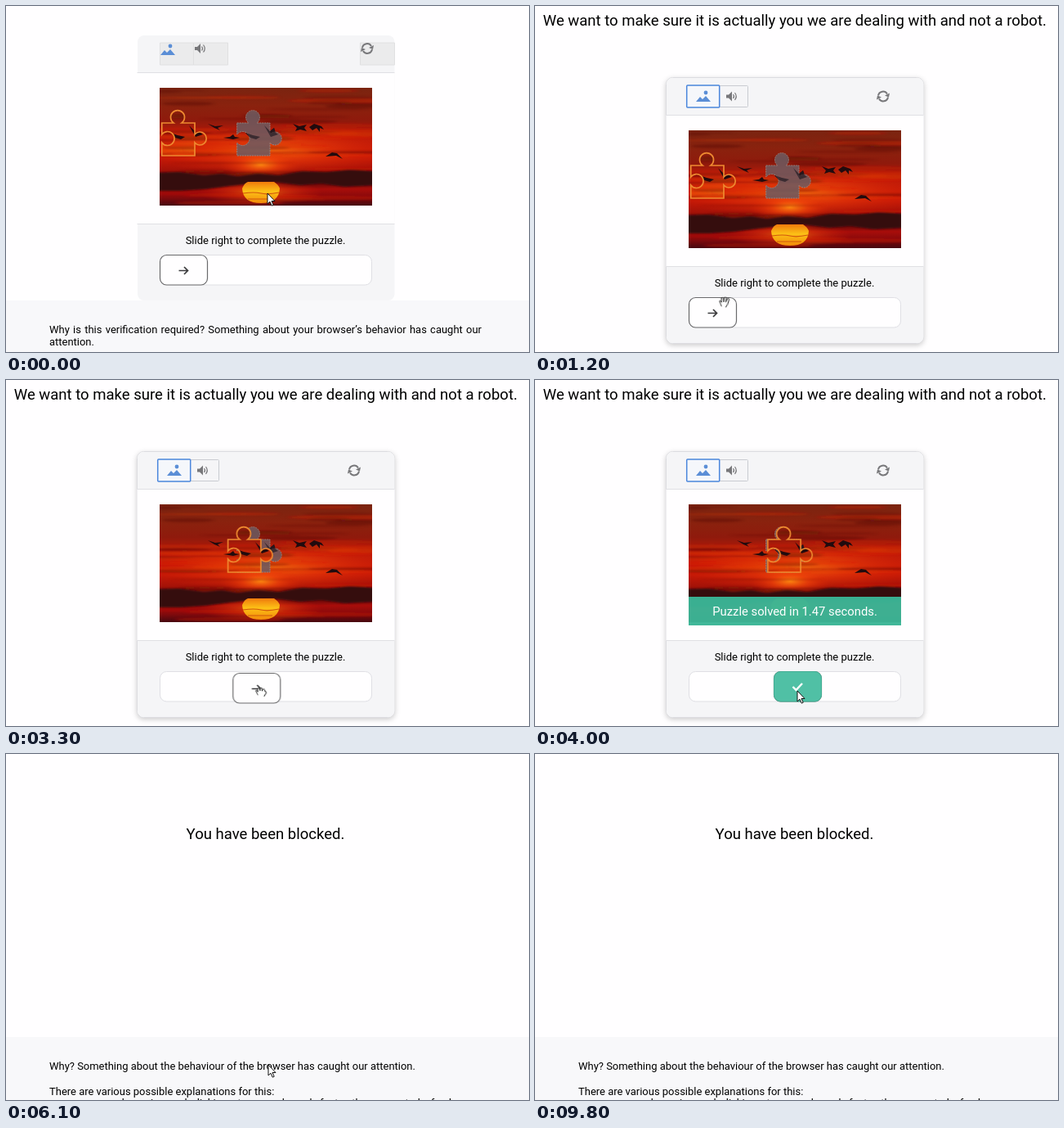
Animation of 640 by 423 pixels, one loop 9900 ms. Source, as an HTML page:

```html
<!DOCTYPE html>
<html lang="en">
<head>
<meta charset="utf-8">
<title>Slide puzzle check</title>
<style>
html, body { margin: 0; width: 100%; height: 100%; overflow: hidden; background: #fffeff; }
#stage { position: relative; width: 640px; height: 423px; overflow: hidden; font: 12.98px/15.4px Roboto, sans-serif; color: #000; }
#stage > svg { position: absolute; left: 0; top: 0; }
.footer { position: absolute; left: 0; width: 529px; height: 400px; padding: 28px 58px 0 53px; background: #f8f8fa; text-align: justify; }
.footer p { margin: 0 0 15.6px; }
.footer ul { margin: -17px 0 0; padding: 0 0 0 39px; }
text { font-family: Roboto, sans-serif; font-size: 13.03px; text-anchor: middle; }
.big { font-size: 18.55px; }
</style>
</head>
<body>
<div id="stage">
  <div class="footer" id="why" style="top:360px">
    <p>Why is this verification required? Something about your browser’s behavior has caught our attention.</p>
  </div>
  <div class="footer" id="reasons" style="top:346px">
    <p>Why? Something about the behaviour of the browser has caught our attention.</p>
    <p>There are various possible explanations for this:</p>
    <ul>
      <li>you are browsing and clicking at a speed much faster than expected of a human being</li>
      <li>something is preventing JavaScript from working on your computer</li>
      <li>there is a robot on the same network as you</li>
    </ul>
  </div>

  <svg width="640" height="423" viewBox="0 0 640 423">
    <defs>
      <linearGradient id="sky" x2="0" y2="1">
        <stop offset="0" stop-color="#7a2410"/>
        <stop offset=".15" stop-color="#8a220e"/>
        <stop offset=".28" stop-color="#8f1a0c"/>
        <stop offset=".42" stop-color="#bd1a08"/>
        <stop offset=".58" stop-color="#cb1a06"/>
        <stop offset=".7" stop-color="#a31208"/>
        <stop offset=".78" stop-color="#5a0d0e"/>
        <stop offset=".86" stop-color="#a80d0a"/>
        <stop offset=".93" stop-color="#840a0c"/>
        <stop offset="1" stop-color="#460810"/>
      </linearGradient>
      <radialGradient id="glow">
        <stop offset="0" stop-color="#ff8a10" stop-opacity=".95"/>
        <stop offset=".45" stop-color="#f5480a" stop-opacity=".6"/>
        <stop offset="1" stop-color="#e02506" stop-opacity="0"/>
      </radialGradient>
      <linearGradient id="sunFill" x2="0" y2="1">
        <stop offset="0" stop-color="#f07a0c"/>
        <stop offset=".45" stop-color="#fcc016"/>
        <stop offset="1" stop-color="#f28a0a"/>
      </linearGradient>
      <filter id="soft" x="-10%" y="-50%" width="120%" height="200%"><feGaussianBlur stdDeviation="2.5 .8"/></filter>
      <clipPath id="frame"><rect x="188" y="152" width="260" height="144"/></clipPath>
      <path id="jigsaw" d="M190.700 195H205a8.5 8.5 0 1 1 10 0H231V209a8 8 0 1 1 0 10V235H190.700V219a8.5 8.5 0 1 0 0-10Z"/>
      <clipPath id="jigsawClip"><use href="#jigsaw"/></clipPath>
      <path id="hiddenBirds" d="M293 207l9 3 9 2-5 3-7-2ZM316 198l7 7 5-4 2 6 3 2-9 3Z"/>

      <g id="picture">
        <rect x="188" y="152" width="260" height="144" fill="url(#sky)"/>
        <ellipse cx="325" cy="228" rx="150" ry="34" fill="url(#glow)" opacity=".75"/>
        <ellipse cx="312" cy="246" rx="50" ry="18" fill="url(#glow)"/>
        <ellipse cx="312" cy="280" rx="75" ry="16" fill="url(#glow)" opacity=".7"/>
        <g filter="url(#soft)">
          <g id="streaks"></g>
          <path fill="#34090f" d="M182 256l30-1 30 4 22-2 20 3 24-3 26 2 28-5 30 1 28-3 34 2v17l-40 2-28-4-26 2-32-4-30 3-24 2-30 4-30 2-32 0Z"/>
        </g>
        <path fill="url(#sunFill)" d="M289 275q3-7 7-8h32q5 3 7 8-1 18-23 18t-23-18Z"/>
        <path fill="none" stroke="#d2560c" stroke-width="1.2" d="M290 281q14-2 22 0t22-1M296 288h30"/>
        <path fill="#210b0e" d="M247 196l9 3 10-1-7 3 3 3-7-3ZM266 213l8-1 4-3 2 3 6 1-8 2ZM351 196l8 3 9-2-3 4 3 4-8-2-6 2 2-4ZM371 200l6-4 9 3 3 4-5-2v5l-4-5-5 3ZM391 236l8-5 6 1 7 7-8-4Z"/>
        <use href="#hiddenBirds" fill="#210b0e"/>
      </g>

      <g id="landscape" fill="#5b8ed6"><path d="M-9 7L-4 1l3 3 4-4 6 7Z"/><circle cx="3" cy="-4" r="2.4"/></g>
      <g id="speaker" fill="#77777a">
        <path d="M-6-2h3l4-4V6l-4-4h-3Z"/>
        <path fill="none" stroke="#77777a" stroke-width="1.2" d="M2.500-2.500q2 2.500 0 5M4.500-4.500q3.500 4.500 0 9"/>
      </g>
      <g id="reload" fill="#77777a">
        <path fill="none" stroke="#77777a" stroke-width="2" d="M-6-1A6 6 0 0 1 5-3M6 1A6 6 0 0 1-5 3"/>
        <path d="M8-4L7 1 2-1ZM-8 4L-7-1-2 1Z"/>
      </g>
    </defs>

    <text id="heading" class="big" x="317.8" y="24.400">We want to make sure it is actually you we are dealing with and not a robot.</text>
    <text id="blocked" class="big" x="317.5" y="104">You have been blocked.</text>

    <g id="card">
      <rect id="shadow" x="160.5" y="87.5" width="315" height="325" rx="8" fill="#fff" stroke="#dcdce0" style="filter:drop-shadow(0 2px 3px #0003)"/>
      <rect x="161" y="88" width="314.5" height="324" rx="8" fill="#f5f5f7"/>
      <path fill="#fffeff" stroke="#e0e0e4" d="M160.5 133.5h315v185h-315" stroke-dasharray="315 185"/>

      <g id="plainTools">
        <path fill="#ebebec" stroke="#e0e0e1" d="M188.5 97h41v27h-41ZM229.5 97h42v27h-42ZM433.5 97h42v27h-42Z"/>
        <use href="#landscape" x="198" y="105"/>
        <use href="#speaker" x="237" y="104"/>
        <use href="#reload" x="442" y="104"/>
      </g>
      <g id="tools">
        <rect x="224.5" y="97.5" width="36" height="26" rx="1" fill="#f5f5f7" stroke="#c9cbd1"/>
        <rect x="185.7" y="97" width="40" height="27" rx="1" fill="#f5f7fb" stroke="#4a86dc" stroke-width="1.5"/>
        <use href="#landscape" x="206" y="110"/>
        <use href="#speaker" x="240" y="110.5"/>
        <use href="#reload" x="426" y="110.5"/>
      </g>

      <g clip-path="url(#frame)">
        <use href="#picture"/>
        <use href="#jigsaw" x="92" fill="#6e5c62" fill-opacity=".85" stroke="#94807e" stroke-dasharray="2 1"/>
        <use href="#hiddenBirds" fill="#2c1c22" opacity=".7"/>
        <g id="piece">
          <g clip-path="url(#jigsawClip)"><use href="#picture" x="-92"/></g>
          <use href="#jigsaw" fill="none" stroke="#ee8a30" stroke-width="1.7"/>
        </g>
      </g>
      <g id="banner">
        <rect x="188" y="265" width="260" height="35" fill="#3bb596" fill-opacity=".97"/>
        <text x="318" y="288" fill="#fff" style="font-size:14.8px">Puzzle solved in 1.47 seconds.</text>
      </g>

      <text x="317.5" y="343">Slide right to complete the puzzle.</text>
      <rect x="188.5" y="356.5" width="259" height="36.5" rx="8" fill="#fffeff" stroke="#dfdfe4"/>
      <g id="knob">
        <rect x="188.5" y="356.5" width="58" height="36.5" rx="8" fill="#fffeff" stroke="#6a6a6c" stroke-width="1.2"/>
        <path fill="none" stroke="#3a3a3c" stroke-width="1.7" d="M211.500 375.500h10.500M218 371l4.500 4.500-4.500 4.500"/>
        <g id="done">
          <rect x="188.500" y="356.500" width="58" height="36.500" rx="8" fill="#50c0a5" stroke="#42ae94"/>
          <path fill="none" stroke="#fff" stroke-width="2.400" d="M211.500 375l4 4 7.500-8"/>
        </g>
      </g>
    </g>

    <g id="cursor" fill="#fff" stroke="#111" stroke-linejoin="round">
      <path id="arrow" d="M0 0V13l3-2.800 2.200 5 2-.9-2.200-4.800h4Z"/>
      <g id="hand"><path transform="rotate(12)" stroke-width=".9" d="M-2.500 6l-4-6q1-1.500 3 1l-1.500-5q1.500-1.500 2.500 0l1.500 4-.5-5.500q1.500-1 2.500 0l.5 5 1-4.500q1.500-1 2.500.500l-1 7-1.500 3.500"/></g>
      <g id="fist"><path transform="rotate(12)" stroke-width=".9" d="M-2.500 6l-4-5q1-1.500 3 1l-1-4q1.500-1.500 2.500 0l1 2-.5-3q1.500-1 2.500 0l.5 3 .5-2.500q1.500-1 2.500.500l.5 2q1.500-1 2 1l-2 5"/></g>
    </g>
  </svg>
</div>

<script>
const LOOP = 9900, TICK = 100;
const $ = id => document.getElementById(id);

// Seeded cloud streaks, softened by a blur
let seed = 11;
const random = () => (seed = seed * 16807 % 2147483647) / 2147483647;
const tones = ['#4a0f10', '#d81a06', '#5a140e', '#e8400a'];
for (let i = 0; i < 70; i++) {
  const streak = document.createElementNS('http://www.w3.org/2000/svg', 'ellipse');
  const shape = {
    cx: 188 + random() * 260, cy: 154 + random() * 140,
    rx: 25 + random() * 60, ry: .8 + random() * 2,
    fill: tones[i % 4], opacity: .15 + random() * .25
  };
  for (const name in shape) streak.setAttribute(name, shape[name]);
  $('streaks').append(streak);
}

// Each step is [time, value]; values advance on the tick, or hold until the next step
function track(id, prop, steps, hold) {
  const all = [...steps, [LOOP, steps.at(-1)[1]]];
  const frames = all.map(([time, value], i) => {
    const span = i + 1 < all.length ? all[i + 1][0] - time : TICK;
    return { offset: time / LOOP, [prop]: value, easing: `steps(${hold ? 1 : Math.max(1, Math.round(span / TICK))})` };
  });
  $(id).animate(frames, { duration: LOOP, iterations: Infinity });
}
const move = (id, steps, hold) =>
  track(id, 'transform', steps.map(([t, x, y]) => [t, `translate(${x}px, ${y}px)`]), hold);
const show = (id, from, to = LOOP) => {
  const steps = from ? [[0, 0], [from, 1]] : [[0, 1]];
  if (to < LOOP) steps.push([to, 0]);
  track(id, 'opacity', steps, true);
};

const STYLED = 200, GRAB = 2100, SOLVED = 3600, GONE = 4600, RELOAD = 5300, BLOCKED = 5500;

show('why', 0, STYLED);
show('plainTools', 0, STYLED);
show('heading', STYLED, GONE);
show('shadow', STYLED);
show('tools', STYLED);
show('card', 0, GONE);
move('card', [[0, 0, -52], [STYLED, 0, 0]], true);

const drag = [[0, 0], [GRAB, 0], [2500, 30.5], [3500, 104]];
move('knob', [[0, 0, 0], [GRAB - TICK, 0, 0], [GRAB, 0, 2], [2500, 30.5, 2], [3500, 104, 2], [SOLVED, 104, 0]]);
move('piece', drag.map(([t, x]) => [t, x * .905, 0]));
show('done', SOLVED);
track('banner', 'opacity', [[0, 0], [SOLVED - TICK, 0], [SOLVED + TICK, 1]]);

show('reasons', RELOAD);
move('reasons', [[0, 0, -319], [BLOCKED, 0, 0]], true);
show('blocked', BLOCKED);

move('cursor', [[0, 320, 229], [300, 320, 229], [1000, 232, 358], [1200, 232, 362], [1800, 226, 378],
  [GRAB, 226, 380], [2500, 256, 380], [3500, 326, 380], [SOLVED, 321, 380],
  [7300, 321, 380], [7800, 565, 426]]);
track('arrow', 'opacity', [[0, 1], [1000, 0], [SOLVED, 1]], true);
show('hand', 1000, GRAB);
show('fist', GRAB, SOLVED);
</script>
</body>
</html>
```
